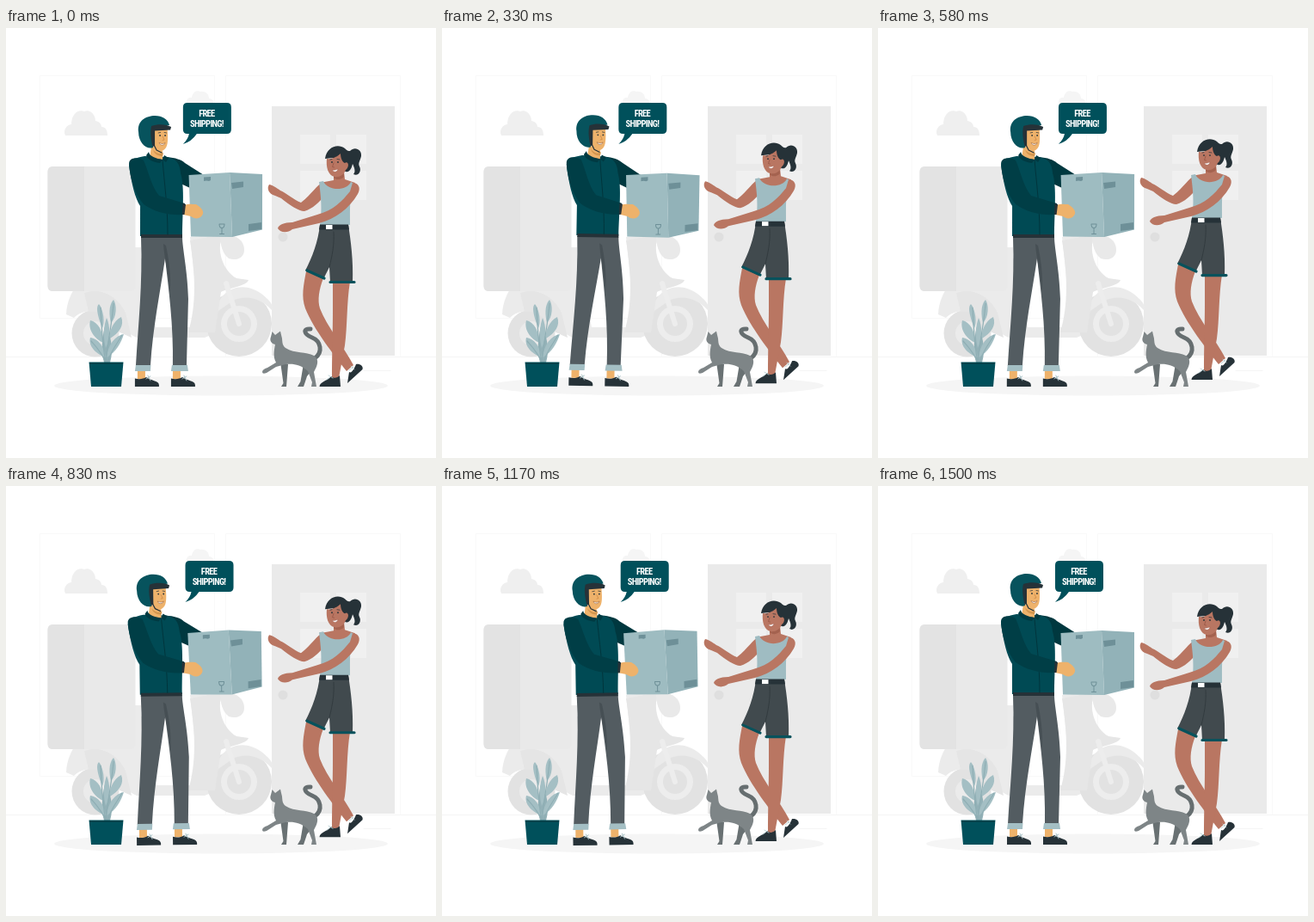
Recreate the animation shown at these times as an HTML page. Size 500 by 500 pixels, loop 1540 ms.

```html
<!DOCTYPE html>
<html lang="en">
<head>
<meta charset="utf-8">
<title>Free shipping</title>
<style>
  html, body { margin: 0; width: 100%; height: 100%; overflow: hidden; background: #fff; }
  svg { display: block; width: 100vw; height: 100vh; }
  text { font: bold 10.5px "Roboto Condensed", Roboto, sans-serif; letter-spacing: -.7px; fill: #fff; text-anchor: middle; }
  .line { fill: none; stroke-linecap: round; stroke-linejoin: round; }
</style>
</head>
<body>
<svg viewBox="0 0 500 500">
  <!-- room -->
  <g class="line" stroke="#f9f9f9">
    <path d="M39.500 55.500H242.500V337.500H39.500ZM255.500 382V55.500H458.500V382"/>
    <path stroke="#f5f5f5" d="M0 382.500H500M416 398.500H447"/>
  </g>
  <g fill="#efefef">
    <path d="M69 125C66 119 70 113 76 112C76 100 84 94 91 97C97 94 104 100 104 108C109 109 111 112 111 115C116 115 118 119 118 125Z"/>
    <path fill="#f5f5f5" d="M210 88C209 83 213 80 216 81C217 74 222 72 226 74C232 73 236 77 236 82C240 82 242 85 241 88Z"/>
    <ellipse cx="250" cy="416" rx="194" ry="11.500" fill="#f5f5f5"/>
  </g>
  <path fill="#eaeaea" d="M309 91H452V381H309Z"/>
  <path fill="#f0f0f0" d="M342 124H377V158H342ZM384 124H419V158H384ZM342 166H377V200H342ZM384 166H419V200H384Z"/>
  <circle cx="322" cy="243" r="5.500" fill="#dfdfdf"/>

  <!-- scooter -->
  <g fill="#e2e2e2">
    <circle cx="104" cy="355" r="27.500"/>
    <circle cx="104" cy="355" r="14" fill="#ebebeb"/>
    <path fill="#ebebeb" d="M70 333C72 303 90 290 108 277L119 268H158L174 348H215C226 337 219 292 214 243L252 240C243 268 246 300 249 329L243 355L231 360H152C132 351 126 333 105 329C93 328 84 332 79 337Z"/>
    <path fill="#e5e5e5" d="M91 308C112 301 130 313 139 331L146 360L128 352C122 336 108 328 96 330Z"/>
    <path fill="#ebebeb" d="M117 262Q117 255 124 255H157V270H123Q117 269 117 262Z"/>
    <circle cx="271" cy="344" r="38"/>
    <circle cx="271" cy="344" r="21" fill="#ededed"/>
    <circle cx="271" cy="344" r="14"/>
    <path fill="#ebebeb" d="M244 331C247 302 279 289 305 316Q312 323 309 328C298 315 279 309 264 317Z"/>
    <path fill="#e6e6e6" d="M214 247L252 240C244 258 252 282 268 291L282 293C280 300 260 302 250 307L243 354H212C222 320 220 285 214 247Z"/>
    <path fill="#e9e9e9" d="M249 242C262 238 277 244 277 258C277 268 267 271 259 268C252 263 249 252 249 242Z"/>
    <path class="line" stroke="#ededed" stroke-width="6" d="M256 297L271 344"/>
    <rect x="48.500" y="161" width="102" height="145" rx="6" fill="#e9e9e9"/>
    <path fill="#e3e3e3" d="M54.500 161H91V306H54.500Q48.500 306 48.500 300V167Q48.500 161 54.500 161Z"/>
  </g>

  <!-- plant -->
  <g fill="#a4bfc4">
    <path fill="#93b1b7" d="M114 389C110 374 112 357 116 343C121 358 126 372 121 389Z"/>
    <path d="M108 321C103 325 109 341 112 349C116 341 112 325 108 321ZM125 316C119 322 120 335 122 343C129 336 129 322 125 316ZM134 336C125 341 120 351 121 361C131 355 138 346 134 336ZM98 340C95 351 103 361 113 366C113 352 107 342 98 340ZM98 360C95 370 106 380 116 383C114 370 107 361 98 360ZM137 356C127 358 119 367 117 383C128 377 134 366 137 356ZM117 337C113 348 113 360 116 372C122 360 121 346 117 337Z"/>
    <path class="line" stroke="#8eaeb4" stroke-width="1.200" d="M116 389C112 370 111 345 110 325M116 389C118 365 124 340 125 320M116 389C110 375 104 370 99 364M118 389C123 373 130 366 135 357"/>
    <path fill="#00505b" d="M96.500 388.500H136.500L134 417H99Z"/>
    <path fill="#00424b" d="M97 389H136V391H97Z"/>
  </g>

  <!-- cat -->
  <g fill="#7e8587">
    <path class="line" stroke="#666e70" stroke-width="5" d="M359 384C369 377 366 364 356 360C346 356 345 349 354 350"/>
    <path fill="#697173" d="M319 388L328 391L326 417H320L322.500 413ZM346 390L357 396L350 405L346 417H339L342.500 411Z"/>
    <path d="M309.500 353L313 357L319 352.500L320.500 359C322 363 320 368 325 372C336 379 349 376 358 381C365 385 362 393 358 400L361 417H355L356 412L351 399C342 391 334 390 325 391L314 394L303 401Q298 403 298 400Q298 397 304 395L314 389C310 382 312 374 313 368C309 367 306 364 308 359Z"/>
  </g>

  <!-- customer -->
  <g id="woman" fill="#b97662">
    <path d="M349 283L369 291C364 304 362 316 365 326C373 347 393 371 404 392L396 399C382 381 358 351 348 326C343 312 346 299 349 283Z"/>
    <path fill="#263238" d="M397 413L399 400C402 402 405 396 407 391C411 390 416 393 414.500 397Z"/>
    <path d="M380 295H400C396 319 397 348 394 369L387 407H379C379 380 380 350 380 330Z"/>
    <path fill="#263238" d="M364.500 417C365 411 373 411 378 405C382 408 385 407 388 404L389 417Z"/>
    <path class="line" stroke="#b8d0d3" stroke-width=".9" d="M373 409L377 406M375 404L380 407M399 398L404 394M401 393L405 397"/>
    <path d="M370 179C361 182 356 193 343 203C335 200 326 192 319 189C315 186 309 182 306 182C303 186 305 193 313 195L320 198C330 206 340 213 347 213C357 210 363 203 370 196Z"/>
    <path fill="#414a4e" d="M365 229H398C401 248 404 270 403 296H377L376 278L369 292L348 282C356 267 363 248 365 229Z"/>
    <path class="line" stroke="#2f383c" stroke-width=".8" d="M381 237C382 252 379 266 376 278"/>
    <path class="line" stroke="#07525c" stroke-width="3.200" stroke-linecap="butt" d="M350 282L370 291M377 295.500H405"/>
    <path d="M381 167H393L394 176L406 180C401 197 369 196 365 180L381 177Z"/>
    <path fill="#9fbcc2" d="M364 179L369 178C374 190 396 190 401 179L405 181C399 195 400 211 400 229H365C368 211 366 195 364 179Z"/>
    <path fill="#263238" d="M365 228.500H398L399 234.500H364Z"/>
    <path fill="#fff" d="M372 229H379.500V234H372Z"/>
    <path fill="#a4624f" d="M381 171C386 174 391 171 393 167L393 173C389 177 384 177 381 174Z"/>
    <path d="M403 180C410 180 413 186 409 193C399 210 383 222 364 227L333 234C327 239 319 238 316 233C317 229 323 226 333 226L362 217C381 212 391 201 400 190Z"/>
    <path fill="#263238" d="M371 152C373 138 386 134 394 140C397 143 398 143 400 143C406 137 414 142 413 149C412 154 409 157 411 161C414 167 409 173 404 170C407 167 405 162 403 158C402 163 399 170 393 166L380 151Z"/>
    <path d="M373 152C379 153 386 149 389 146C389 151 391 156 394 157C398 154 400 161 395 165C393 171 387 174 382 173C374 171 372 161 373 152Z"/>
    <circle cx="379" cy="156" r=".9" fill="#263238"/>
    <circle cx="386" cy="156" r=".9" fill="#263238"/>
    <path class="line" stroke="#263238" stroke-width=".7" d="M377 153L379 152.500M385 152.500L388 153"/>
    <path class="line" stroke="#92503f" stroke-width=".7" d="M381 157L379.500 161.500L381.500 162"/>
    <path fill="#fff" stroke="#92503f" stroke-width=".4" d="M379.500 165C382 165.500 384 165 386 164C385.500 167.500 381 168.500 379.500 165Z"/>
  </g>

  <!-- courier -->
  <g id="man" fill="#eeb26b">
    <path d="M153 397H162V408H153ZM194 397H203V408H194Z"/>
    <path fill="#263238" d="M150 417V407.500C155 409 160 408 163 406C168 410 178 410 178 415V417ZM192 417V407.500C197 409 202 408 205 406C210 410 220 410 220 415V417Z"/>
    <path class="line" stroke="#a4bfc4" stroke-width=".9" d="M163 408L168 405M165 404L168 410M205 408L210 405M207 404L210 410"/>
    <path fill="#535c61" d="M157 243H205C205 256 211 281 212 315L210 393H194C195 345 189 303 185 268C179 309 171 347 168 393H151C154 343 159 298 157 243Z"/>
    <path fill="#464f54" d="M183 251C184 268 189 285 191 308C192 287 189 267 186 253Z"/>
    <path fill="#a4bfc4" d="M151 392H168.500L168 399H150ZM193 392H211L212 399H192Z"/>
    <path fill="#00383f" d="M187 150C197 151 204 153 208 157L230 171L214 186L201 180Z"/>
    <path fill="#004a54" d="M161 149C151 151 144 153 143 160C146 181 150 198 156 207V242H205C205 215 208 185 203 169C202 157 198 152 187 150Z"/>
    <path fill="#263238" d="M157 240H205V244H157Z"/>
    <path d="M169 137L182 143L182 153L167 151Z"/>
    <path fill="#d3964f" d="M171 142C177 147 180 147 183 145L182 149C177 149 173 147 171 142Z"/>
    <path fill="#003a42" d="M166 144C166 149 175 152 182 153L179 157C170 156 164 152 163 148ZM184 148L189 151L186 156L182 153Z"/>
    <path class="line" stroke="#00333a" stroke-width=".9" d="M182 154C184 180 188 207 188 240"/>
    <path d="M171 116H187.500C188 124 189 134 186 139C183 144 176 145 172 140Z"/>
    <path fill="#07535d" d="M154 121C152 108 163 102 173 102C182 102 188 106 190 113L172 117C168 122 171 132 171 139C164 142 154 134 154 121Z"/>
    <path fill="#263238" d="M169 114C177 111 187 112 192 115L191 118.500L173 119.500L173 137L170.500 138C169 131 167 122 169 114Z"/>
    <path class="line" stroke="#263238" stroke-width="1.200" d="M172 136L175 142L181 145"/>
    <circle cx="179" cy="125" r=".9" fill="#263238"/>
    <circle cx="185" cy="125" r=".9" fill="#263238"/>
    <path class="line" stroke="#263238" stroke-width=".7" d="M177 122L179.500 121.500M184 121.500L186.500 122"/>
    <path class="line" stroke="#c9823e" stroke-width=".7" d="M182 126L184 130L182 130.500"/>
    <path fill="#fff" stroke="#8a4c24" stroke-width=".5" d="M178 133.500C181 135 183 135 185 133.500C184 137 179 137 178 133.500Z"/>

    <path fill="#9ebcc1" d="M212.500 171L260 168L263 243L215 242.500Z"/>
    <path fill="#92b2b8" d="M260 168L298 170V234.500L263 243Z"/>
    <path fill="#6e9098" d="M230 173.500L238 173V177L236 178L233 177.500L230 178ZM262 180L276 178.500V185L263 187ZM282 228L297 226V234L282 236Z"/>
    <path class="line" stroke="#6e9098" d="M248 228H254C254 234 248 234 248 228ZM251 233V239M248.500 239.500H253.500"/>

    <path d="M207 206C213 204 217 205 221 205C226 208 230 212 229 216C227 222 220 223 215 219L206 217Z"/>
    <path fill="#003e46" d="M143 158C143 150 154 150 160 154C166 168 169 184 178 195L208 204L206 217C190 218 172 214 160 205C150 193 144 175 143 158Z"/>
    <path fill="#263238" d="M205.500 204L209 205L207.500 217H205Z"/>
  </g>

  <g id="bubble">
    <path fill="#00505b" d="M211 87H257Q262 87 262 92V118Q262 123 257 123H222Q216 132 206 135Q212 129 213 123H211Q206 123 206 118V92Q206 87 211 87Z"/>
    <text x="233.500" y="102.500">FREE</text>
    <text x="233.500" y="114.500">SHIPPING!</text>
  </g>
</svg>
<script>
const LOOP = 1540, LEAD = 18;
const [man, woman, bubble] = ["man", "woman", "bubble"].map(id => document.getElementById(id));

// CSS "ease": cubic-bezier(.25, .1, .25, 1)
function ease(x) {
  const bezier = (a, b, s) => 3 * a * s * (1 - s) ** 2 + 3 * b * s * s * (1 - s) + s ** 3;
  let lo = 0, hi = 1;
  for (let i = 0; i < 20; i++) {
    const mid = (lo + hi) / 2;
    if (bezier(.25, .25, mid) < x) lo = mid; else hi = mid;
  }
  return bezier(.1, 1, lo);
}

// stops: [position, value] pairs, eased one by one
function keyframes(stops, p) {
  const i = stops.findIndex(([at]) => at > p);
  const [p0, v0] = stops[i - 1], [p1, v1] = stops[i];
  return v0 + (v1 - v0) * ease((p - p0) / (p1 - p0));
}

const sway = [[0, 0], [.25, 1], [.75, -1], [1, 0]];
const shake = [0, -1, 2, -4, 4, -4, 4, -4, 2, -1, 0].map((x, i) => [i / 10, x]);

function draw(now) {
  const p = (now + LEAD) % LOOP / LOOP;
  man.setAttribute("transform", `rotate(${keyframes(sway, p)} 220 259)`);
  woman.setAttribute("transform", `translate(0 ${-4.5 * (1 - Math.cos(2 * Math.PI * p))})`);
  bubble.setAttribute("transform", `translate(${keyframes(shake, p)} 0)`);
}

const start = performance.now();
function tick() {
  draw(performance.now() - start);
  requestAnimationFrame(tick);
}
draw(0);
requestAnimationFrame(tick);
</script>
</body>
</html>
```
